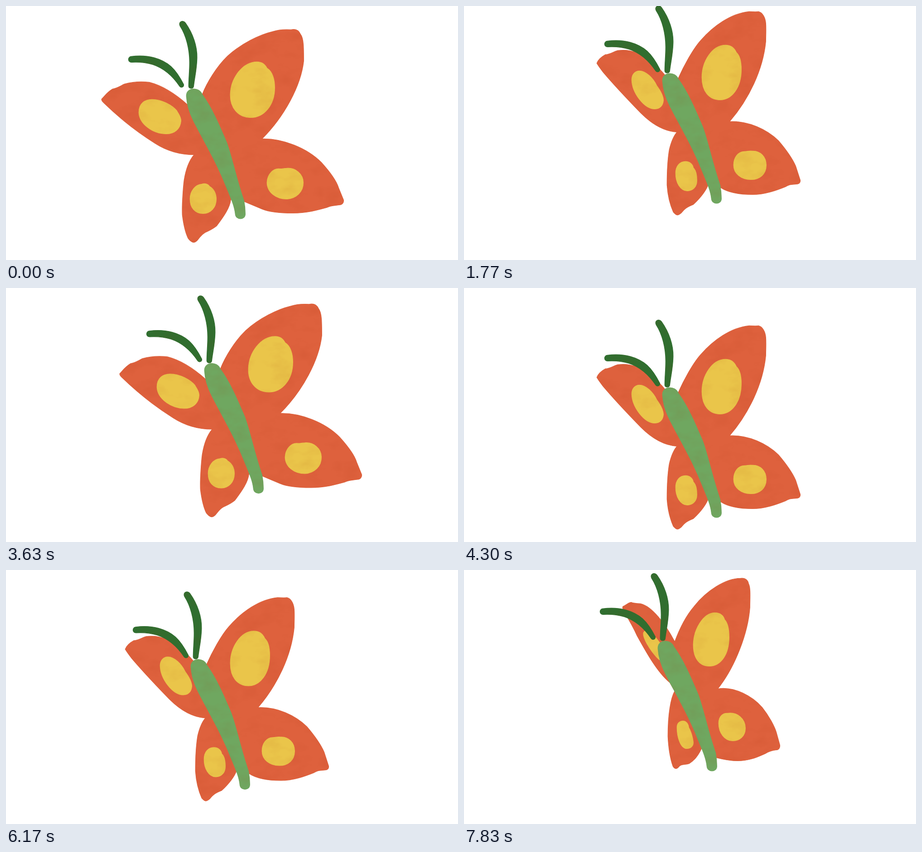
An HTML page for the animation above (7910 ms loop, 998 by 561 pixels).

```html
<!DOCTYPE html>
<html lang="en">
<head>
<meta charset="utf-8">
<title>Butterfly</title>
<style>
  html, body { margin: 0; width: 100%; height: 100%; overflow: hidden; background: #fff; }
  svg { display: block; width: 100%; height: 100%; }
  path { stroke-width: 1.3; stroke-linejoin: round; }
  .wing { fill: #de613d; stroke: #de613d; }
  .spot { fill: #eac54a; stroke: #eac54a; }
  .body { fill: #6fa760; stroke: #6fa760; }
  .feeler { fill: #306e2f; stroke: #306e2f; }
  .pose { display: none; }
  .pose.on { display: inline; }
</style>
</head>
<body>
<svg viewBox="0.7 0.6 998 561">
  <defs>
    <!-- faint uneven paint -->
    <filter id="paint" filterUnits="userSpaceOnUse" x="200" y="25" width="560" height="510" color-interpolation-filters="sRGB">
      <feTurbulence type="fractalNoise" baseFrequency=".02 .035" numOctaves="4" seed="4"/>
      <feColorMatrix values="0 0 0 0 .6  0 0 0 0 .15  0 0 0 0 0  .18 0 0 0 -.08"/>
      <feComposite operator="atop" in2="SourceGraphic"/>
    </filter>
  </defs>
  <g id="fly" filter="url(#paint)">
    <!-- open -->
    <g class="pose on">
      <path class="wing" d="M434 196C444 170 466 134 490 111C520 84 560 64 590 57C602 53 615 52 630 53C642 50 648 56 651 63C658 72 658 92 658 122C652 176 616 244 566 294
        C612 293 665 314 697 346C716 367 730 386 735 402L746 429C747 436 742 440 736 440C722 442 718 441 708 446C690 451 665 458 634 458C605 458 580 455 566 449L528 433
        L497 428C495 446 482 465 466 486C456 494 450 496 440 501C430 507 426 516 421 520C416 525 410 523 403 514C396 500 392 478 390 462C389 440 392 400 394 385C398 360 405 342 416 329
        C386 329 358 322 330 304C290 279 250 247 217 215C213 211 211 208 212 206C218 200 224 191 236 184C246 182 250 179 262 173C280 168 300 167 317 169C345 176 375 195 402 219Z"/>
      <g class="spot">
        <path d="M496 195C497 160 523 124 555 124C566 124 573 130 577 138C589 145 594 163 594 181C594 220 570 247 541 247C513 247 495 225 496 195Z"/>
        <path d="M294 236C294 215 308 207 323 207C345 207 368 220 378 232C380 237 387 244 387 254C386 272 373 283 354 283C325 283 295 261 294 236Z"/>
        <path d="M577 390C578 372 590 360 603 360C610 361 613 359 620 359C640 357 657 372 657 390C658 412 640 426 621 427C597 427 577 412 577 390Z"/>
        <path d="M407 427C407 410 418 395 433 394C441 391 448 395 450 399C459 404 465 414 465 427C465 446 452 459 436 459C418 459 407 446 407 427Z"/>
      </g>
    </g>
    <!-- half folded -->
    <g class="pose">
      <path class="wing" d="M433 196C446 167 466 130 483 111C511 79 550 51 590 47C599 47 604 48 611 47C620 49 626 60 627 73C628 86 627 100 627 113C621 175 590 240 547 290
        C590 288 630 308 655 332C672 352 686 372 693 388L703 419C704 425 700 428 694 428C684 429 680 428 670 434C650 442 625 451 598 451C572 451 545 447 528 436
        L500 429C495 442 484 457 467 473C452 479 447 483 441 491C433 498 430 498 423 490C414 470 410 445 409 430C409 390 411 370 414 352C418 335 424 321 431 313
        C398 311 371 291 351 271C320 239 290 207 268 181C263 174 258 168 254 161C257 153 264 147 273 142C282 142 290 136 300 133C318 131 330 133 342 138C368 148 390 170 406 189L414 200Z"/>
      <g class="spot">
        <path d="M486 192C486 158 508 121 538 121C550 121 558 128 562 137C570 144 573 158 573 175C573 215 552 242 526 242C501 242 486 222 486 192Z"/>
        <path d="M331 198C331 186 338 178 348 178C362 178 378 193 386 210C394 221 401 232 401 243C400 255 393 262 382 262C358 262 332 226 331 198Z"/>
        <path d="M556 386C556 369 566 356 580 356C587 356 590 354 597 355C615 354 628 368 628 386C628 406 614 418 594 418C573 418 556 405 556 386Z"/>
        <path d="M428 404C428 388 437 378 450 378C459 378 466 384 467 392C474 398 475 410 475 420C475 434 466 443 454 443C438 443 428 424 428 404Z"/>
      </g>
    </g>
    <!-- folded -->
    <g class="pose">
      <path class="wing" d="M436 185C446 158 460 129 478 108C506 72 549 45 581 45C592 43 598 50 599 57C604 66 602 90 602 109C598 165 570 240 531 289
        C568 283 608 306 629 330C645 350 656 372 660 384L668 413C669 420 665 424 660 424C650 425 644 427 636 432C620 439 602 448 575 448C555 448 540 444 528 441
        L496 419C491 430 482 446 468 454C460 457 453 455 447 459C441 467 436 467 432 460C425 440 422 415 421 394C421 345 427 310 436 294
        L425 275C398 253 374 210 353 172C344 152 334 135 325 120C321 113 320 108 322 107C328 105 332 99 340 98C346 101 352 100 360 101C385 106 415 145 436 185Z"/>
      <g class="spot">
        <path d="M477 192C477 160 498 121 525 121C537 121 544 128 546 136C553 143 556 158 556 175C556 213 538 239 512 239C491 239 477 222 477 192Z"/>
        <path d="M367 171C365 160 375 157 383 165C398 178 411 196 415 213C417 228 408 230 400 223C388 212 370 186 367 171Z"/>
        <path d="M533 365C533 350 542 342 553 343C575 340 592 356 592 376C592 393 580 404 564 404C546 404 533 386 533 365Z"/>
        <path d="M441 374C441 365 447 360 454 360C461 360 466 366 467 375C471 381 476 396 477 407C477 416 471 421 463 421C448 421 441 394 441 374Z"/>
      </g>
    </g>
    <path class="body" d="M399 200C398 180 427 178 434 196C455 225 470 260 488 302C500 335 510 385 526 430C528 440 529 450 529 460C529 474 508 474 507 460C505 440 495 420 485 395C465 345 438 300 415 255C405 235 400 218 399 200Z"/>
    <g class="feeler">
      <path d="M277 112C315 107 345 117 365 134C378 146 386 160 393 174C394 180 387 182 384 178C372 160 352 139 325 130C308 125 295 124 278 125C269 125 269 113 277 112Z"/>
      <path d="M385 45C380 36 391 30 397 38C414 62 423 90 422.5 115C422 140 417 160 415 178C414 184 405 184 404 178C404 160 406 145 406 125C406 95 398 65 385 45Z"/>
    </g>
  </g>
</svg>
<script>
  const LOOP = 7910;
  const BAR = 1100;                      // ten steps
  const BEATS = [0, 130, 230, 330, 470, 570, 670, 800, 900, 1000];
  const FLAP = [0, 1, 2, 1];
  const DRIFT = [[0, 0], [10, 14.5], [30, 30], [40, 37], [40, 18.5], [40, -16.5], [40, -34], [30, -26], [10, -14]];

  const fly = document.getElementById('fly');
  const poses = document.querySelectorAll('.pose');
  const start = performance.now();
  let shown = -1;

  function stepAt(t) {
    const inBar = t % BAR;
    return Math.floor(t / BAR) * 10 + BEATS.filter(b => b <= inBar).length - 1;
  }

  function draw() {
    // the cycle restarts every 36 steps and rests once, on its fifth drawing
    const step = stepAt((performance.now() - start) % LOOP) % 36;
    const drawing = step < 5 ? step : step - 1;
    if (drawing !== shown) {
      shown = drawing;
      const [x, y] = DRIFT[drawing % DRIFT.length];
      fly.setAttribute('transform', `translate(${x} ${y})`);
      poses.forEach((p, i) => p.classList.toggle('on', i === FLAP[drawing % 4]));
    }
    requestAnimationFrame(draw);
  }
  draw();
</script>
</body>
</html>
```
